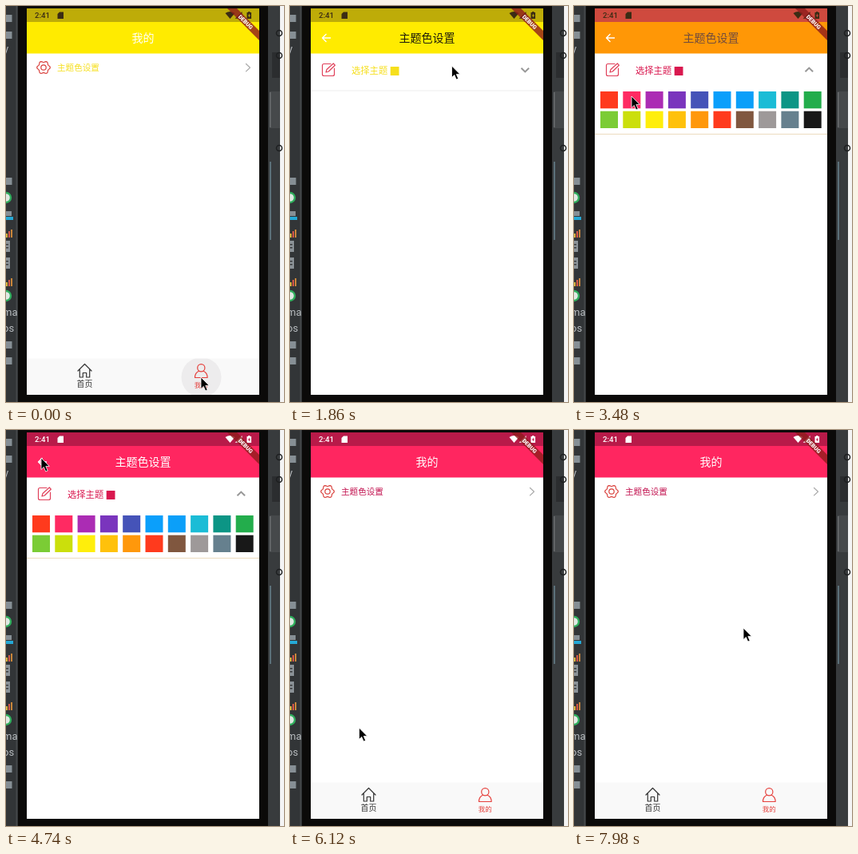
Animation of 348 by 496 pixels, one loop 8 s. Source, as an HTML page:

```html
<!DOCTYPE html>
<html lang="zh-CN">
<head>
<meta charset="utf-8">
<style>
  html, body { margin: 0; width: 100%; height: 100%; overflow: hidden; background: #0b0a09; }
  svg { display: block; width: 348px; height: 496px; }
  text { font-family: Roboto, "Noto Sans CJK SC", "Noto Sans CJK", sans-serif; }
  .mid { text-anchor: middle; }
  .title { font-size: 14px; text-anchor: middle; }
  .list { font-size: 9.9px; letter-spacing: .18px; }
  .line { fill: none; stroke-width: 1.2; stroke-linejoin: round; stroke-linecap: round; }
  .bar { fill: var(--bar); }
  .status { fill: var(--status); }
  .accent { fill: var(--accent); }
  .tab text { fill: currentColor; }
  .tab path, .tab circle { stroke: currentColor; }
</style>
</head>
<body>
<svg id="stage" viewBox="0 0 348 496"></svg>
<script>
const rect = (x, y, w, h, fill, extra = '') =>
  `<rect x="${x}" y="${y}" width="${w}" height="${h}" fill="${fill}" ${extra}/>`;
const text = (x, y, s, attrs = '') => `<text x="${x}" y="${y}" ${attrs}>${s}</text>`;
const line = (d, attrs = '') => `<path class="line" d="${d}" ${attrs}/>`;
const repeat = (n, draw) => Array.from({ length: n }, (_, i) => draw(i)).join('');

const swatches = `ff3a1d ff2a62 ab2cb4 7a35bd 4553b8 0b9ffb 0b9ff9 1bbcd6 0c9585 23ad4c
  7bcc35 cbdf0c ffee0b ffc10b ff980b ff3a1d 80573f 9e9999 66808e 181818`.split(/\s+/);

const header = (title, fill, id = '') =>
  `<rect class="status" x="26" y="3" width="291" height="17"/>
   <rect class="bar" x="26" y="20" width="291" height="39.5"/>
   ${text(171.5, 45.2, title, `class="title" fill="${fill}" ${id}`)}`;

// Desktop visible on both sides of the phone
const bars = y => rect(0, y + 5, 2, 5, '#d9b23c') + rect(3, y + 2, 2, 8, '#d8574a') + rect(6, y, 2, 10, '#c9863a');
const sheet = y => rect(0, y, 5, 14, '#8b9297') + rect(0, y + 4, 3, 1.5, '#3a3d3f') + rect(0, y + 8, 3, 1.5, '#3a3d3f');
const dial = y => `<circle cx="0" cy="${y}" r="6" fill="#dfe8e2" stroke="#2fae5c" stroke-width="2.4"/>`;
const desktop =
  rect(0, 0, 15, 496, '#323537') + rect(12.5, 0, 1.5, 496, '#45484a') +
  rect(328, 0, 15, 496, '#383b3d') + rect(343, 0, 5, 496, '#f4f4f4') +
  rect(333, 58, 10, 32, '#2b2d2f') + rect(330, 107, 13, 46, '#46494b') +
  rect(330, 108, 1.5, 44, '#6b6e70') + rect(330, 195, 2, 98, '#5b7079') +
  [11, 32, 215, 420, 440].map(y => rect(0, y, 7.5, 9, '#868f95')).join('') +
  [34, 62, 178].map(y => `<circle cx="342" cy="${y}" r="3.5" fill="none" stroke="#1d1f20" stroke-width="1.5"/>`).join('') +
  dial(240) + dial(363) + rect(0, 257, 7, 6, '#868f95') + rect(0, 264, 9, 4, '#25a9d6') +
  bars(280) + bars(341) + sheet(294) + sheet(315) +
  [['y', 58], ['ma', 388], ['os', 408], ['.', 466], ['.', 483]]
    .map(([s, y]) => text(-4 + (s.length > 1 ? 0 : 1), y, s, 'font-size="13" fill="#b9bdc0"')).join('');

const gear = 'M' + Array.from({ length: 48 }, (_, i) => {
  const a = i * Math.PI / 24, r = 7.4 + .9 * Math.cos(6 * a);
  return `${(47 + r * Math.cos(a)).toFixed(1)} ${(77 + r * Math.sin(a)).toFixed(1)}`;
}).join('L') + 'Z';

const profilePage = `<g id="profile">
  ${header('我的', '#fff')}
  ${line(gear, 'stroke="#d9403c"')}
  <circle class="line" cx="47" cy="77" r="3.2" stroke="#d9403c"/>
  ${text(64, 81, '主题色设置', 'id="label" font-size="10.6"')}
  ${line('M300.5 72.5l5 4.7-5 4.7', 'stroke="#aaa"')}</g>`;

const listItem = i => `<g transform="translate(0 ${i * 102.7})" class="list">
  ${text(36.5, 77.5, 'title', 'fill="#222"')}
  ${text(307, 78.5, 'salary', 'fill="#e53935" font-size="12.7" text-anchor="end"')}
  ${text(36.5, 97, 'company', 'fill="#8c8c8c"')}
  ${rect(36.5, 107, 28, 15, '#f0eff0', 'rx="2"')}
  ${text(42, 118, 'info', 'fill="#808080"')}
  <circle cx="47" cy="137.2" r="10.7" fill="#0878d8"/>
  ${text(63, 141, 'publish', 'fill="#555" font-size="10.5"')}</g>`;

const homePage = `<g id="home">${header('主页', '#fff')}${repeat(4, listItem)}</g>`;

const nav = rect(26, 441.5, 291, 46, '#f9f9f9') +
  `<g clip-path="url(#navClip)"><circle id="ripple" cy="465" fill="#281428"/></g>
  <g class="tab" id="homeTab">
    ${line('M90 457l8.5-8.5 8.5 8.5M92.3 455.5v9.5h4v-5.5h4.4v5.5h4v-9.5')}
    ${text(98.5, 476.8, '首页', 'class="mid" font-size="9.9"')}</g>
  <g class="tab" id="profileTab">
    <circle class="line" cx="244.3" cy="453.3" r="4.6"/>
    ${line('M241.5 457.3c-3.2 1.4-5 4-5 8.2h15.6c0-4.2-1.8-6.8-5-8.2')}
    ${text(244.3, 478.3, '我的', 'class="mid" font-size="8.5"')}</g>`;

const themePage = `<g id="theme">
  ${rect(26, 3, 291, 484, '#fff')}
  ${header('主题色设置', 'var(--title)')}
  ${line('M51 40H40.5M45.5 35l-5 5 5 5', 'stroke="#fff" style="stroke-width:1.4;stroke-linecap:butt"')}
  ${line('M51 72.5h-8.5q-2 0-2 2v11q0 2 2 2h11q2 0 2-2V78M45 83l1-3.5 8.3-7.5 2 2.2-8 7.8z', 'stroke="#e0405a"')}
  ${text(77, 85, '选择主题', 'class="accent" font-size="11.3"')}
  <rect class="accent" x="125.7" y="76" width="10.8" height="11"/>
  <g id="chevron">${line('M289.5 77.7l4.8 4.7 4.8-4.7', 'stroke="#989898" style="stroke-width:2;stroke-linecap:butt;stroke-linejoin:miter"')}</g>
  <g clip-path="url(#panelClip)">
    ${repeat(20, i => rect(33 + i % 10 * 28.3, i < 10 ? 107 : 131.7, 22, 21.3, '#' + swatches[i]))}</g>
  <rect id="divider" x="26" width="291" height="1"/></g>`;

const statusIcons = `<g fill="var(--ink)">
  ${text(36, 15, '2:41', 'font-size="9.6" font-weight="500"')}
  <path d="M67 7.5h5v8.5h-7.5V10z"/>
  <path d="M274.5 9q6-4 12 0l-6 7z"/>
  <path d="M295.5 7v8.8h-8.8z"/>
  <path d="M301.5 8h1.7V7h2.2v1h1.7v8h-5.6z"/>
  <path d="M304.8 9.5l-2 3h1.3v2l2-3h-1.3z" fill="var(--status)"/></g>`;

const banner = `<g transform="translate(317 3) rotate(45)">
  ${rect(-29, 19.8, 58, 8.5, '#8f1c1c', 'fill-opacity=".8"')}
  ${text(0, 26.6, 'DEBUG', 'class="mid" font-size="7" font-weight="900" fill="#fff"')}</g>`;

const pointer = `<path id="cursor" d="M0 0V14.5L3.3 11.4 5.7 17 8.2 16 5.8 10.4H10.3Z" fill="#000" stroke="#fff" stroke-width=".8"/>`;

stage.innerHTML = `<defs>
  <clipPath id="screenClip">${rect(26, 3, 291, 484, '#000')}</clipPath>
  <clipPath id="navClip">${rect(26, 441.5, 291, 45.5, '#000')}</clipPath>
  <clipPath id="panelClip"><rect id="panel" x="26" y="106" width="291" height="0"/></clipPath></defs>
  ${desktop}
  <g clip-path="url(#screenClip)">
    ${rect(26, 3, 291, 484, '#fff')}${profilePage}${homePage}${nav}${themePage}${statusIcons}${banner}</g>
  ${pointer}`;

const el = id => document.getElementById(id);
const clamp = v => Math.min(1, Math.max(0, v));
const progress = (t, start, length) => clamp((t - start) / length);
const smooth = v => v * v * (3 - 2 * v);

// Material standard curve, cubic-bezier(.4, 0, .2, 1)
function standardCurve(x) {
  let low = 0, high = 1, s;
  for (let i = 0; i < 20; i++) {
    s = (low + high) / 2;
    const bx = 1.2 * (1 - s) ** 2 * s + .6 * (1 - s) * s * s + s ** 3;
    if (bx < x) low = s; else high = s;
  }
  return 3 * (1 - s) * s * s + s ** 3;
}

// Blend through three colours
function blend(stops, v) {
  const i = v < .5 ? 0 : 1, k = v * 2 - i;
  return `rgb(${stops[i].map((c, n) => Math.round(c + (stops[i + 1][n] - c) * k))})`;
}
const barColors = [[255, 235, 0], [255, 152, 5], [255, 38, 96]];
const statusColors = [[190, 172, 8], [207, 74, 62], [184, 26, 73]];
const titleColors = [[30, 28, 10], [112, 74, 60], [255, 255, 255]];

// Pointer moves: start, end, x, y
const start = [244, 465];
const moves = [
  [540, 1320, 202.5, 75], [2460, 3240, 72, 113], [3600, 4080, 44, 35],
  [5700, 6300, 98, 465], [6540, 6940, 132.5, 143], [6980, 7320, 244, 465], [7500, 7960, 212, 248]
];
const taps = [[-260, 244.5], [6360, 98.5], [7340, 244.5]];

function cursorAt(t) {
  let [x, y] = start;
  for (const [from, to, nx, ny] of moves) {
    const k = smooth(progress(t, from, to - from));
    x += (nx - x) * k;
    y += (ny - y) * k;
  }
  return [x, y];
}

function render(t) {
  const shift = progress(t, 3380, 200), pink = t >= 3420;
  const vars = {
    bar: blend(barColors, shift), status: blend(statusColors, shift), title: blend(titleColors, shift),
    ink: shift < .9 ? '#3b2c14' : '#fff', accent: pink ? '#d9184f' : '#f6df1c'
  };
  for (const name in vars) stage.style.setProperty('--' + name, vars[name]);
  el('label').setAttribute('fill', pink ? '#c2124f' : '#f6df1c');

  const onHome = t >= 6420 && t < 7400;
  el('home').style.display = onHome ? '' : 'none';
  el('profile').style.display = onHome ? 'none' : '';
  el('homeTab').style.color = onHome ? '#e5403c' : '#333';
  el('profileTab').style.color = onHome ? '#333' : '#e5403c';

  const open = t < 4000 ? progress(t, 1560, 300) : 1 - progress(t, 4925, 300);
  const theme = el('theme');
  theme.style.display = open ? '' : 'none';
  theme.style.opacity = open ** 1.55;
  theme.style.filter = open < .4 ? 'grayscale(1)' : 'none';
  theme.setAttribute('transform', `translate(0 ${121 * (1 - standardCurve(open))})`);

  const expand = smooth(progress(t, 1980, 200));
  el('panel').setAttribute('height', 54 * expand);
  el('divider').setAttribute('y', 105.5 + 54.5 * expand);
  el('divider').setAttribute('fill', expand > .5 ? '#ecdcc0' : '#eee');
  el('chevron').setAttribute('transform', `rotate(${180 * expand} 294.3 80)`);

  const [tapTime, tapX] = taps.filter(tap => tap[0] <= t).pop();
  const ripple = el('ripple');
  ripple.setAttribute('cx', tapX);
  ripple.setAttribute('r', 25 * smooth(progress(t, tapTime, 200)));
  ripple.setAttribute('opacity', .055 * (1 - progress(t, tapTime + 300, 240)));

  el('cursor').setAttribute('transform', `translate(${cursorAt(t)})`);
}

function tick() {
  render(performance.now() % 8000);
  requestAnimationFrame(tick);
}
tick();
</script>
</body>
</html>
```
